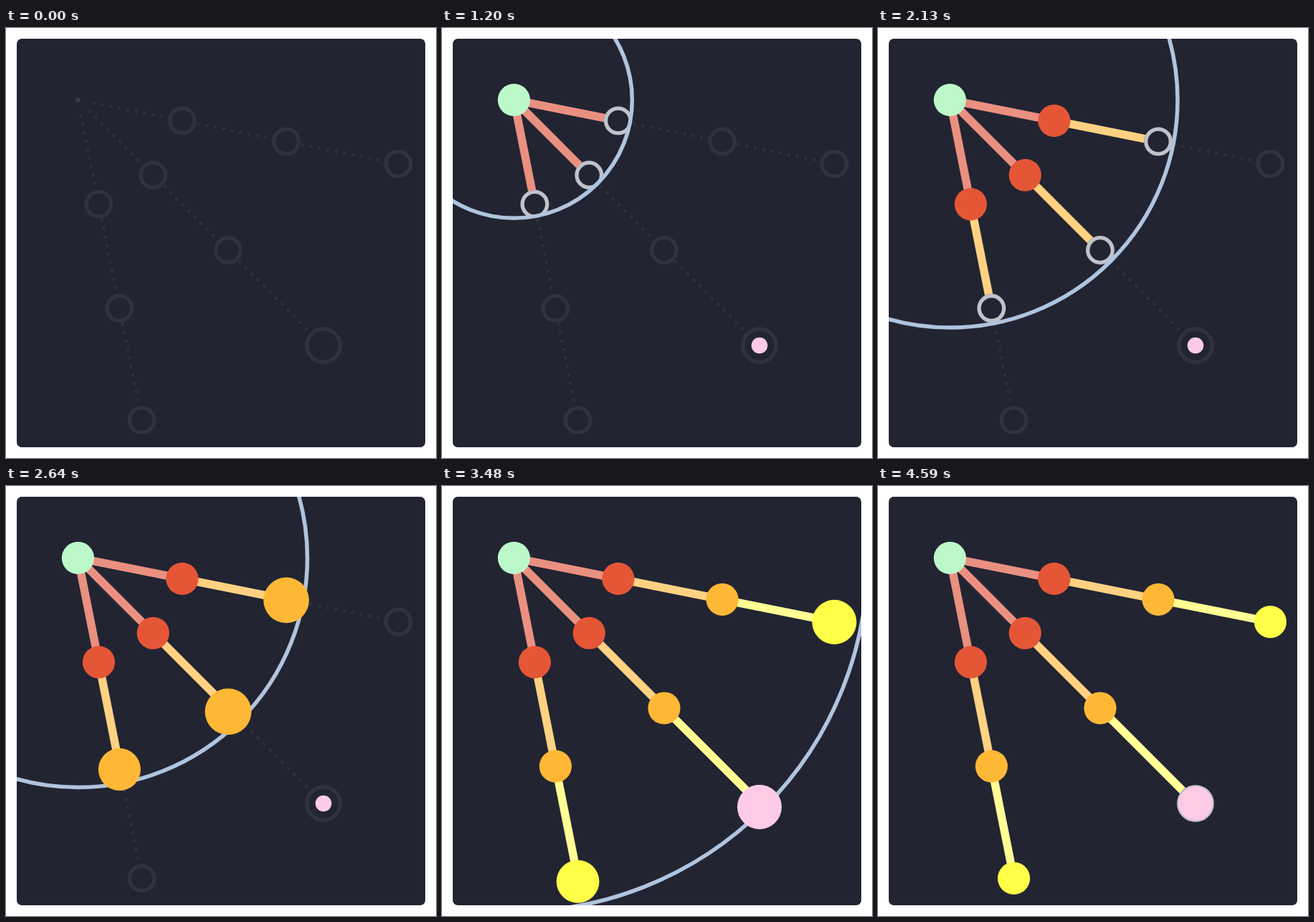
An HTML page with a canvas for the animation above (5.4 s loop, 600x600 px).

```html
<!DOCTYPE html>
<html>
<head>
<meta charset="utf-8">
<style>
html, body { margin: 0; width: 100%; height: 100%; overflow: hidden; background: #fff; }
canvas { display: block; }
</style>
</head>
<body>
<canvas id="stage" width="600" height="600"></canvas>
<script>
const ctx = document.getElementById('stage').getContext('2d');
const LOOP = 5400, STEP = 30, ORIGIN = 100.4, TAU = Math.PI * 2;
const PANEL = '#222432', WAVE = '#b0c4de', GREEN = '#bdf8cb', PINK = '#fdcbe6';
const NODE = 22.6, LINE_MS = 350, RISE_MS = 462, FALL_MS = 198;
const LINE_COLORS = ['#ea9080', '#ffd182', '#ffff94'];
const NODE_COLORS = ['#e55637', '#ffb836', '#ffff48'];

// Start time of the first branch and the delay between branches, per level
const LINE_START = [[805, 0], [1712, 8], [2590, 100]];
const POP_START = [[1254, 8], [2156, 100], [2988, 100]];
// Wave front: start, duration, radius before, radius after
const WAVES = [[865, 400, 72, 172], [1760, 400, 172, 320], [2635, 400, 320, 493.6], [3500, 600, 493.6, 720]];

const clamp = x => Math.max(0, Math.min(1, x));
const mix = (a, b, k) => a + (b - a) * k;
const smooth = x => x * x * (3 - 2 * x);

// cubic-bezier(.25, .1, .25, 1)
function ease(x) {
  if (x <= 0 || x >= 1) return clamp(x);
  let lo = 0, hi = 1, s;
  for (let i = 0; i < 20; i++) {
    s = (lo + hi) / 2;
    if (0.75 * s * (1 - s) + s ** 3 < x) lo = s; else hi = s;
  }
  return 0.3 * (1 - s) ** 2 * s + 3 * (1 - s) * s * s + s ** 3;
}

const branches = [[11.28, 455.8], [45, 484.5], [78.72, 455.8]].map(([deg, far], b) => {
  const a = deg * Math.PI / 180;
  return [0, 148.3, 296.4, far].map((d, i) => ({
    x: ORIGIN + d * Math.cos(a),
    y: ORIGIN + d * Math.sin(a),
    goal: b === 1 && i === 3
  }));
});
const goal = branches[1][3];

function disc(x, y, r, color) {
  ctx.fillStyle = color;
  ctx.beginPath();
  ctx.arc(x, y, Math.max(0, r), 0, TAU);
  ctx.fill();
}

function circle(x, y, r, width, color) {
  ctx.strokeStyle = color;
  ctx.lineWidth = width;
  ctx.beginPath();
  ctx.arc(x, y, r, 0, TAU);
  ctx.stroke();
}

function swell(t, from, peak, to) {
  return t < RISE_MS
    ? mix(from, peak, ease(t / RISE_MS))
    : mix(peak, to, ease((t - RISE_MS) / FALL_MS));
}

// Grow past the final size, sagging a little, then snap back
function pop(p, t, color, to, from = 0, peak = to * 1.46) {
  if (t <= 0) return;
  const sag = t < RISE_MS ? ease(t / RISE_MS) : clamp(1 - (t - RISE_MS) / 40) ** 2;
  disc(p.x, p.y + 5 * sag, swell(t, from, peak, to), color);
}

function eachLink(draw) {
  branches.forEach((nodes, b) => {
    for (let i = 0; i < 3; i++) draw(nodes[i], nodes[i + 1], i, b);
  });
}

function dots(color) {
  eachLink((p, q) => {
    const len = Math.hypot(q.x - p.x, q.y - p.y);
    const end = len - (q.goal ? 23 : 16.5);
    for (let d = 23; d < end; d += 11.95)
      disc(mix(p.x, q.x, d / len), mix(p.y, q.y, d / len), 2.3, color);
  });
}

function rings(color) {
  eachLink((p, q) => {
    const r = q.goal ? 23.2 : 17.3;
    disc(q.x, q.y, r, PANEL);
    circle(q.x, q.y, r, 5.3, color);
  });
}

function clipWave(r, draw) {
  ctx.save();
  ctx.beginPath();
  ctx.arc(ORIGIN, ORIGIN, r, 0, TAU);
  ctx.clip();
  draw();
  ctx.restore();
}

function waveRadius(t) {
  let r = swell(t, 0, 80, 72);
  for (const [start, span, from, to] of WAVES)
    if (t > start) r = mix(from, to, smooth(clamp((t - start) / span)));
  return r;
}

function lines(t) {
  eachLink((p, q, i, b) => {
    const [start, gap] = LINE_START[i];
    const k = clamp((t - start - gap * b) / LINE_MS);
    if (!k) return;
    ctx.strokeStyle = LINE_COLORS[i];
    ctx.lineWidth = 11.4;
    ctx.beginPath();
    ctx.moveTo(p.x, p.y);
    ctx.lineTo(mix(p.x, q.x, k), mix(p.y, q.y, k));
    ctx.stroke();
  });
}

function render(t) {
  ctx.clearRect(0, 0, 600, 600);
  ctx.save();
  ctx.beginPath();
  ctx.roundRect(15, 15, 570, 570, 7);
  ctx.fillStyle = PANEL;
  ctx.fill();
  ctx.clip();

  const r = waveRadius(t);
  dots('#2f313e');
  disc(ORIGIN, ORIGIN, 3.5, '#3a3c48');
  clipWave(r, () => dots('#a4a5aa'));
  lines(t);
  rings('#30323f');
  clipWave(r, () => rings('#c1c2c9'));
  if (r > 0) circle(ORIGIN, ORIGIN, r, 5.5, WAVE);

  pop(branches[0][0], t, GREEN, NODE);
  eachLink((p, q, i, b) => {
    const since = t - POP_START[i][0] - POP_START[i][1] * b;
    if (!q.goal) pop(q, since, NODE_COLORS[i], NODE);
    else if (since > 0) pop(goal, since, PINK, 23.7, 11.3, 31.3);
    else pop(goal, t, PINK, 11.3);
  });
  ctx.restore();
}

const begin = performance.now();
function tick() {
  const t = (performance.now() - begin) % LOOP;
  render(Math.floor(t / STEP) * STEP);
  requestAnimationFrame(tick);
}
tick();
</script>
</body>
</html>
```
